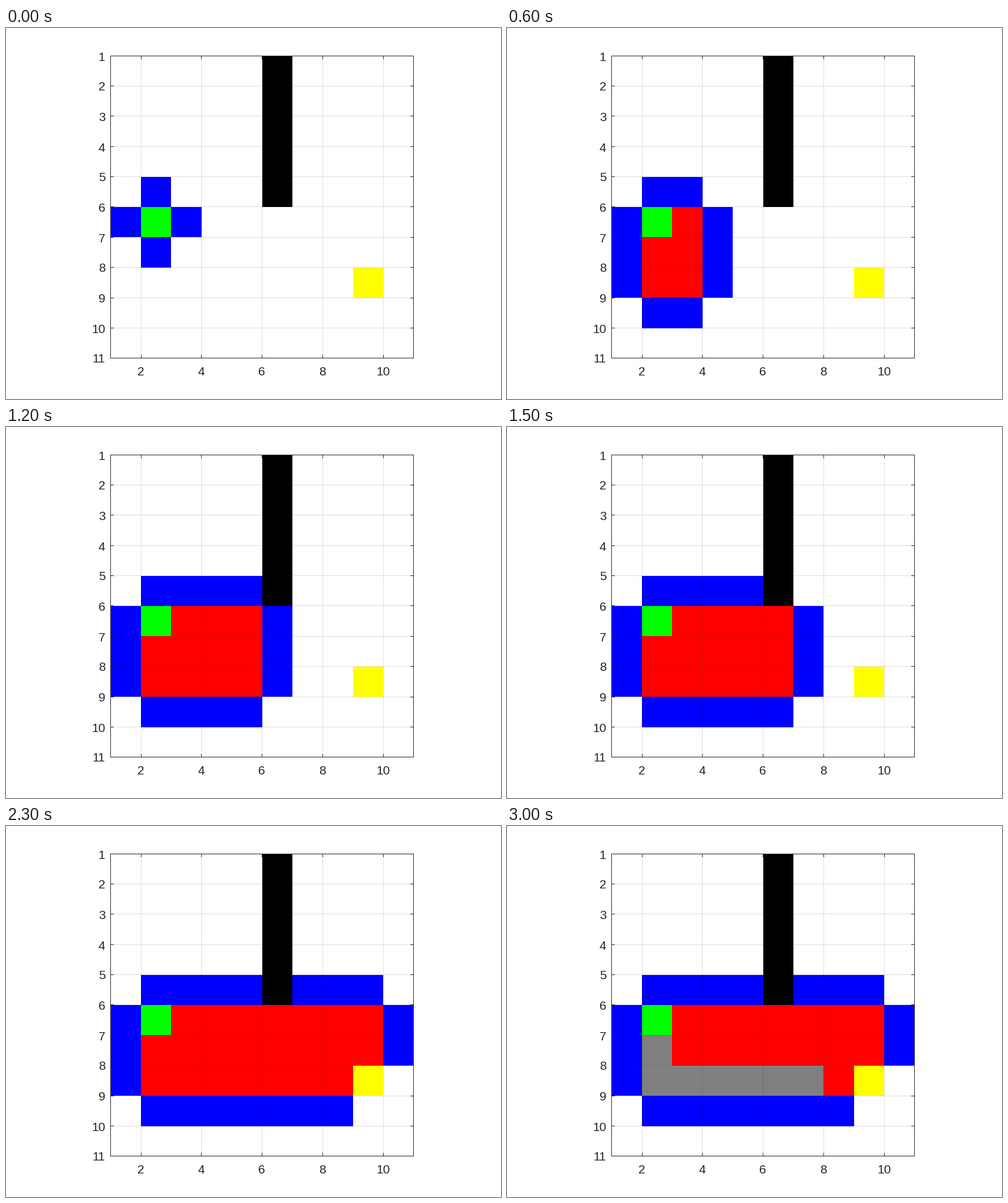
A matplotlib script for the animation above (3.1 s loop, 840 px wide and 630 px high).

```python
import math

import matplotlib.pyplot as plt
from matplotlib.animation import FuncAnimation
from matplotlib.patches import Rectangle

W, H, DPI = 840, 630, 150
N = 10
STEP = 51.345
FRAMES, INTERVAL = 31, 100

START, GOAL = (6, 2), (8, 9)  # (row, column)
WALLS = {(row, 6) for row in range(1, 6)}

INK = "#262626"
WHITE, BLACK, GREEN, YELLOW = "#ffffff", "#000000", "#00ff00", "#ffff00"
BLUE, RED, GRAY = "#0000ff", "#ff0000", "#808080"


def neighbours(cell):
    r, c = cell
    for nxt in ((r - 1, c), (r + 1, c), (r, c - 1), (r, c + 1)):
        if 1 <= nxt[0] <= N and 1 <= nxt[1] <= N and nxt not in WALLS:
            yield nxt


def distance(a, b):
    return abs(a[0] - b[0]) + abs(a[1] - b[1])


def search():
    """A* search; returns the cell colours after every step."""
    colours = {cell: BLACK for cell in WALLS}
    colours.update({START: GREEN, GOAL: YELLOW})
    cost, parent = {START: 0}, {}
    frontier, states = {START}, []

    def rank(cell):
        # ties are broken column by column
        return cost[cell] + distance(cell, GOAL), cell[1], cell[0]

    while True:
        cell = min(frontier, key=rank)
        if cell == GOAL:
            break
        frontier.remove(cell)
        if cell != START:
            colours[cell] = RED
        for nxt in neighbours(cell):
            if nxt not in cost:
                cost[nxt] = cost[cell] + 1
                parent[nxt] = cell
                frontier.add(nxt)
                colours.setdefault(nxt, BLUE)
        states.append(dict(colours))

    path = []
    cell = parent[GOAL]
    while cell != START:
        path.append(cell)
        cell = parent[cell]
    for cell in reversed(path):
        colours[cell] = GRAY
        states.append(dict(colours))
    return states


fig = plt.figure(figsize=(W / DPI, H / DPI), dpi=DPI, facecolor=WHITE)
ax = fig.add_axes([0, 0, 1, 1])
ax.set_xlim(0, W)
ax.set_ylim(H, 0)
ax.axis("off")


def box(x, y, w, h, colour, z, alpha=1):
    patch = Rectangle((x, y), w, h, facecolor=colour, alpha=alpha,
                      linewidth=0, antialiased=False, zorder=z)
    return ax.add_patch(patch)


# whole-pixel cell edges and line positions
edge_x = [round(177.78 + STEP * k) for k in range(N + 1)]
edge_y = [round(47.41 + STEP * k) for k in range(N + 1)]
line_x = [math.floor(177.9 + STEP * k) for k in range(N + 1)]
line_y = [math.floor(47.25 + STEP * k) for k in range(N + 1)]
left, right, top, bottom = line_x[0], line_x[-1], line_y[0], line_y[-1]
TICK = 5

cells = {}
for r in range(1, N + 1):
    for c in range(1, N + 1):
        x, y = edge_x[c - 1], edge_y[r - 1]
        cells[r, c] = box(x, y, edge_x[c] - x, edge_y[r] - y, WHITE, 1)

for value in range(2, N + 1, 2):
    x = line_x[value - 1]
    box(x, top + 1, 1, bottom - top - 1, INK, 2, 0.15)
    box(x, top, 1, TICK + 1, INK, 3)
    box(x, bottom - TICK, 1, TICK + 1, INK, 3)
    ax.text(x + 0.2, 590.5, str(value), size=10, color=INK,
            family="Liberation Sans", ha="center", va="baseline")

for value in range(1, N + 2):
    y = line_y[value - 1]
    if 1 < value <= N:
        box(left + 1, y, right - left - 1, 1, INK, 2, 0.15)
        box(left, y, TICK + 1, 1, INK, 3)
        box(right - TICK, y, TICK + 1, 1, INK, 3)
    ax.text(168.5, y + 8.5, str(value), size=10, color=INK,
            family="Liberation Sans", ha="right", va="baseline")

for y in (top, bottom):
    box(left, y, right - left + 1, 1, INK, 3)
for x in (left, right):
    box(x, top, 1, bottom - top + 1, INK, 3)

states = search()


def update(frame):
    colours = states[max(frame - 1, 0)]
    for cell, patch in cells.items():
        patch.set_facecolor(colours.get(cell, WHITE))
    return list(cells.values())


anim = FuncAnimation(fig, update, frames=FRAMES, interval=INTERVAL,
                     repeat=True, repeat_delay=0, blit=False)
plt.show()
```
